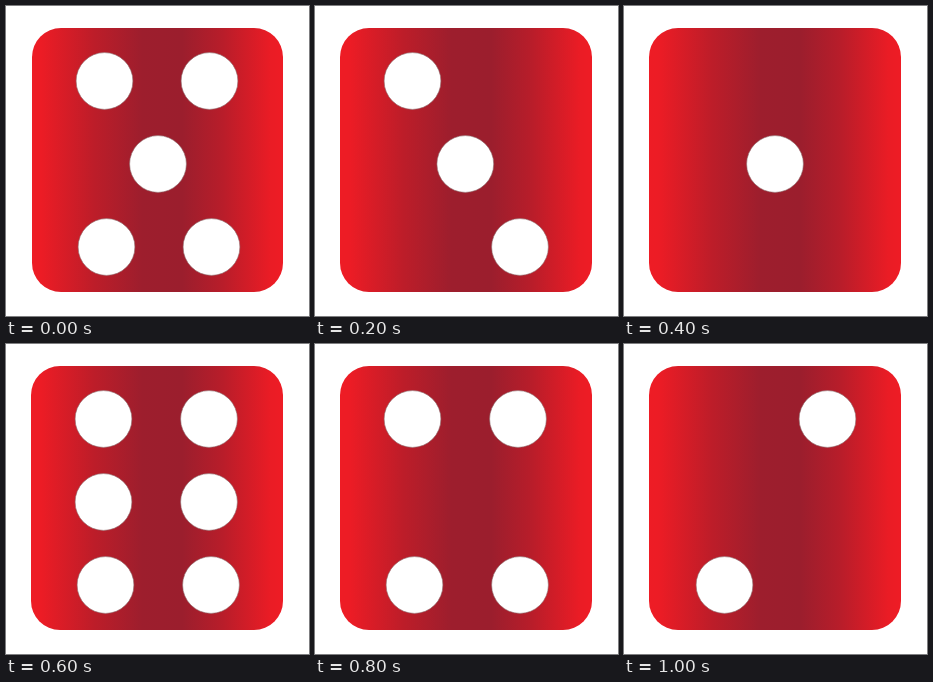
An HTML page for the animation above (1200 ms loop, 303 by 310 pixels).

```html
<!DOCTYPE html>
<html lang="en">
<head>
<meta charset="utf-8">
<title>Rolling die</title>
<style>
  html, body { margin: 0; width: 100%; height: 100%; overflow: hidden; background: #fff; }
  svg { display: block; width: 100%; height: 100%; }
  .pip { fill: #fff; stroke: #8d6a6c; stroke-width: .6; }
</style>
</head>
<body>
<svg viewBox="0 0 303 310">
  <defs>
    <linearGradient id="red" gradientUnits="userSpaceOnUse" x1="25" y1="0" x2="277" y2="0">
      <stop offset="0" stop-color="#ee1c25"/>
      <stop offset=".04" stop-color="#ec1c25"/>
      <stop offset=".25" stop-color="#bd1d29"/>
      <stop offset=".44" stop-color="#9d1e2d"/>
      <stop offset=".6" stop-color="#9b1e2d"/>
      <stop offset=".76" stop-color="#b81d2a"/>
      <stop offset=".95" stop-color="#ea1c25"/>
      <stop offset="1" stop-color="#ee1c25"/>
    </linearGradient>
  </defs>
  <rect id="body" x="25" y="22" width="252" height="264" rx="29" fill="url(#red)"/>
  <g id="pips"></g>
</svg>
<script>
const STEP = 200;
const ROWS = { t: 75, m: 158, b: 241 };

// Each face: left edge of the die, then pips as row + x centre.
const FACES = [
  [26, 't98.5 t203.5 m152 b100.5 b205.5'],
  [25, 't97.5 m150.3 b205'],
  [25, 'm151'],
  [25, 't97.5 t203 m97.5 m203 b99.5 b205'],
  [25, 't97.5 t203 b99.5 b205'],
  [25, 't203.5 b100.5']
];

const body = document.getElementById('body');
const pips = document.getElementById('pips');
let shown = -1;

function showFace(i) {
  const [left, spots] = FACES[i];
  body.setAttribute('x', left);
  body.setAttribute('width', 277 - left);
  pips.innerHTML = spots.split(' ').map(s =>
    `<circle class="pip" cx="${s.slice(1)}" cy="${ROWS[s[0]]}" r="28.4"/>`).join('');
  shown = i;
}

let start;
function tick(now) {
  start ??= now;
  const i = Math.floor(Math.max(0, now - start) / STEP) % FACES.length;
  if (i !== shown) showFace(i);
  requestAnimationFrame(tick);
}
showFace(0);
requestAnimationFrame(tick);
</script>
</body>
</html>
```
